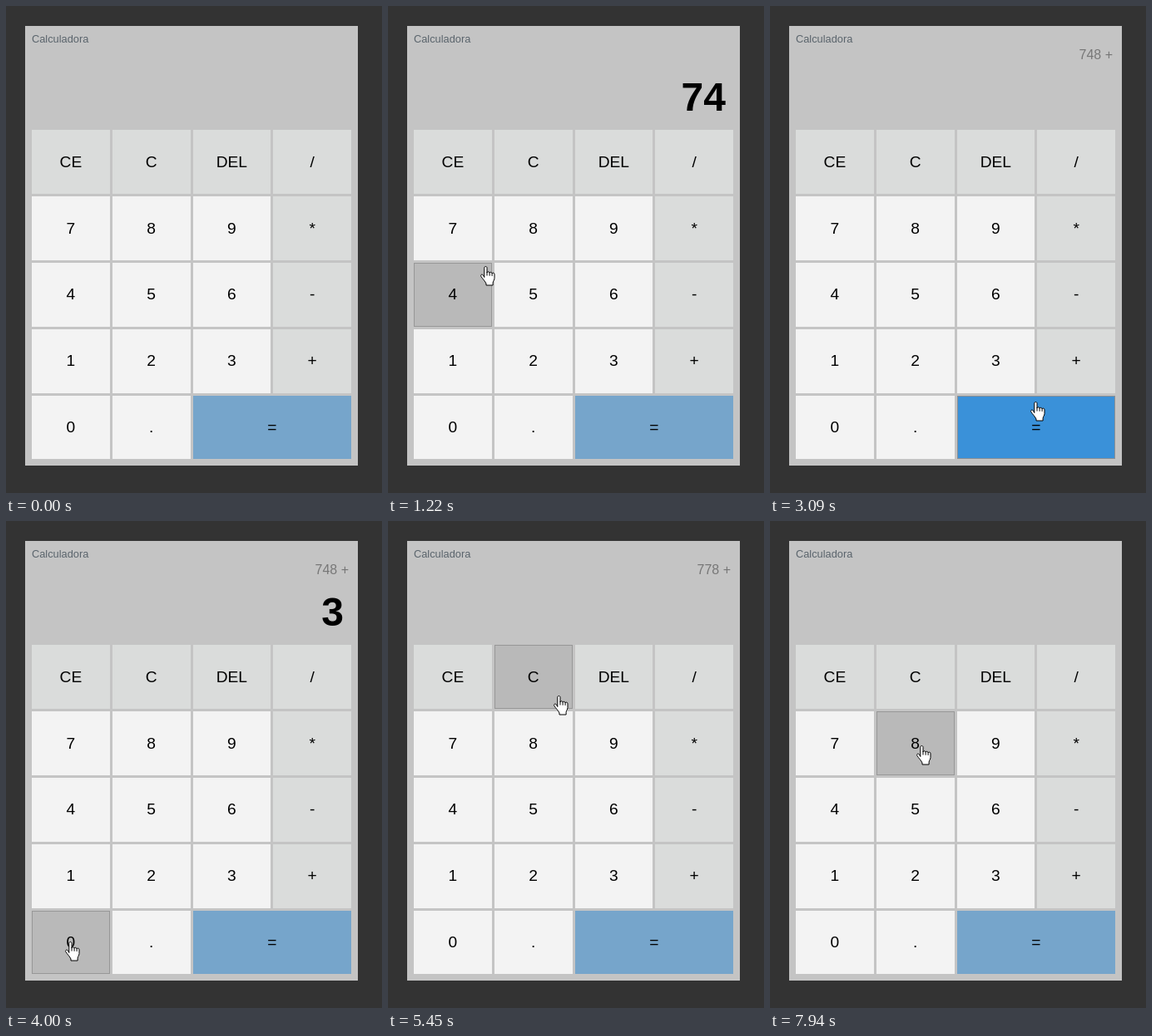
Recreate the animation shown at these times as an HTML page. Size 452 by 586 pixels, loop 8 s.

```html
<!DOCTYPE html>
<html lang="pt">
<head>
<meta charset="utf-8">
<title>Calculadora</title>
<style>
html, body { margin: 0; width: 100%; height: 100%; overflow: hidden; background: #333; }
body { position: relative; font-family: Arial, "Liberation Sans", sans-serif; }
#panel { position: absolute; left: 23px; top: 24px; width: 400px; height: 529px; background: #c4c4c4; }
#title, #history, #value { position: absolute; white-space: pre; }
#title { left: 31px; top: 32px; font-size: 12.8px; line-height: 15px; color: #5a646c; }
#history { right: calc(100% - 412px); top: 50px; font-size: 16px; line-height: 17px; color: #777; }
#value { right: calc(100% - 406px); top: 83px; font-size: 48px; line-height: 53px; font-weight: bold; color: #000; }
#keys {
  position: absolute; left: 31px; top: 149.4px; width: 384px; height: 396px;
  display: grid; grid-template: repeat(5, 1fr) / repeat(4, 1fr); gap: 3px;
}
#keys div {
  box-sizing: border-box; border: 1px solid transparent; background: #f3f3f3;
  display: grid; place-items: center; font-size: 19.2px; line-height: 22px; color: #000;
}
#keys .op { background: #dadcdb; }
#keys .eq { grid-column: span 2; background: #76a5cb; }
#keys .on { background: #b9b9b9; border-color: #979797; }
#keys .eq.on { background: #3a91d9; border-color: #8a8f94; }
#hand { position: absolute; left: 0; top: 0; overflow: visible; }
</style>
</head>
<body>
<div id="panel"></div>
<div id="title">Calculadora</div>
<div id="history"></div>
<div id="value"></div>
<div id="keys"></div>
<svg id="hand" width="18" height="24" stroke="#000" stroke-linejoin="round">
  <path fill="#fff" d="M4.8 13.5V2.2c0-2.3 3.2-2.3 3.2 0V8c0-1.8 3.1-1.6 3.1.4c0-1.7 3-1.5 3 .6c.2-1.4 2.9-1.2 2.9.8v4.7c0 2.2-1.9 3.8-1.9 5.6V23H7v-2C6 18.4 2.4 15 .9 12.4c-1-2 1-3 2.6-1.5z"/>
  <path fill="none" d="M8 7.5v4M11.1 8.4v3.3M14.1 9v2.9"/>
</svg>
<script>
const LOOP = 8000, REST = 150, ORBIT = 6740, ORBIT_TIME = 1200;
const $ = id => document.getElementById(id);
const labels = 'CE C DEL / 7 8 9 * 4 5 6 - 1 2 3 + 0 . ='.split(' ');

const keys = labels.map((text, i) => {
  const el = document.createElement('div');
  el.textContent = text;
  el.className = text === '=' ? 'eq' : i < 4 || i % 4 === 3 ? 'op' : '';
  return $('keys').appendChild(el);
});
const boxes = keys.map(el => el.getBoundingClientRect());

// Stops of the pointer: when it leaves a key, with an offset from the key's centre
function pass(t, key, dx = 0, dy = 0, rest = 0) {
  const b = boxes[labels.indexOf(key)];
  return { t, key, rest, x: b.left + b.width / 2 + dx, y: b.top + b.height / 2 + dy };
}
// A press rests on the key and clicks just before leaving
const press = (t, key, dx, dy) => pass(t, key, dx, dy, REST);

const tour = [
  pass(70, '=', 83, 68),
  press(820, '7', 15), press(1150, '4'), press(1440, '8', -18, 14),
  pass(1600, '5'), pass(1850, '6', 0, -20), pass(2150, '-'), press(2450, '+'),
  pass(3090, '=', 0, -30), press(3640, '3', -40, 15), press(4100, '0'), press(4550, '='),
  press(4810, '+', -33), pass(5130, '/'), pass(5450, 'C', 32, 23),
  pass(5900, 'CE'), press(6480, 'C', 2, -9)
];

// Counterclockwise circling over the four keys around (128, 228), slowing down
function orbit(t) {
  const turn = Math.min(1, (t - ORBIT) / ORBIT_TIME) ** 0.745;
  const angle = (-45 - 637 * turn) * Math.PI / 180;
  return { x: 128 + 70 * Math.cos(angle), y: 228 + 70 * Math.sin(angle) };
}

function pointAt(t) {
  if (t >= ORBIT) return orbit(t);
  const i = tour.findIndex(s => s.t > t);
  if (i < 0) return tour[tour.length - 1];
  if (i === 0) return null;
  const a = tour[i - 1], b = tour[i];
  const k = Math.min(1, (t - a.t) / (b.t - b.rest - a.t));
  return { x: a.x + (b.x - a.x) * k, y: a.y + (b.y - a.y) * k };
}

function calculate(t) {
  let history = '', value = '';
  for (const { key } of tour.filter(s => s.rest && s.t <= t)) {
    if (key === 'C') history = value = '';
    else if (key === '+') { history = value + ' +'; value = ''; }
    else if (key === '=') { value = String(parseFloat(history) + Number(value)); history = ''; }
    else value += key;
  }
  return { history, value };
}

function draw(t) {
  const { history, value } = calculate(t);
  $('history').textContent = history;
  $('value').textContent = value;

  const tip = pointAt(t);
  $('hand').style.visibility = tip ? 'visible' : 'hidden';
  const x = tip ? Math.round(tip.x) : -1, y = tip ? Math.round(tip.y) : -1;
  $('hand').style.transform = `translate(${x - 7}px, ${y - 1}px)`;
  keys.forEach((el, i) => {
    const b = boxes[i];
    el.classList.toggle('on', x >= b.left && x < b.right && y >= b.top && y < b.bottom);
  });
}

const start = performance.now();
function tick() {
  draw((performance.now() - start) % LOOP);
  requestAnimationFrame(tick);
}
tick();
</script>
</body>
</html>
```
